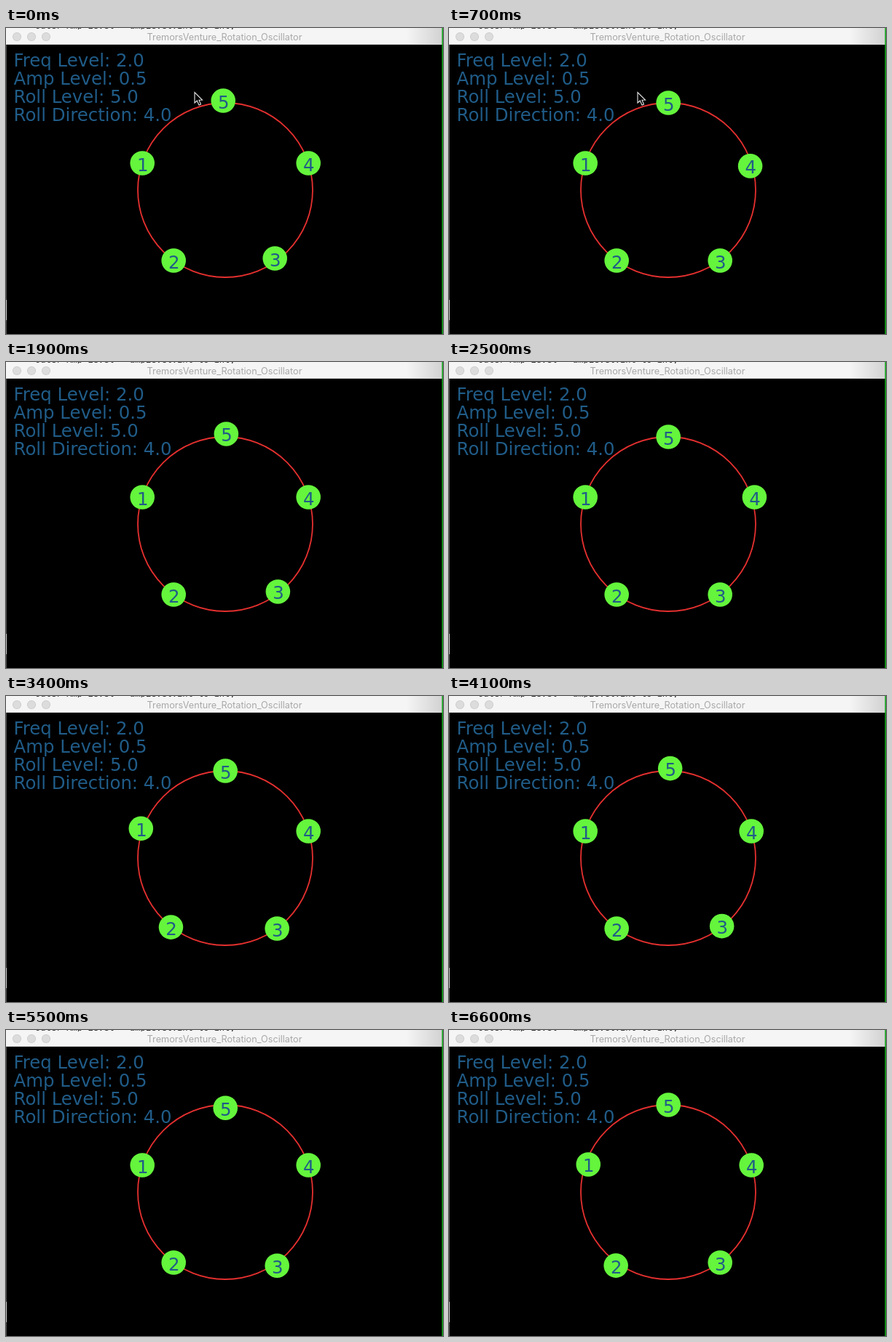
Write an HTML page with a canvas that moves like this. It is 600 px wide and 421 px high and loops after 6700 ms.

```html
<!DOCTYPE html>
<html lang="en">
<head>
<meta charset="utf-8">
<title>Actuator ring</title>
<style>
  html, body { margin: 0; width: 100%; height: 100%; overflow: hidden; background: #000; }
  canvas { display: block; width: 600px; height: 421px; }
</style>
</head>
<body>
<canvas id="stage" width="600" height="421"></canvas>
<script>
const ctx = document.getElementById('stage').getContext('2d');
const LOOP = 6700, STEP = 100, SWING = 4.2;
const BLUE = '#205c88', GREEN = '#64f53c', RED = '#e4302f';
const FONT = '24.4px "DejaVu Sans", Verdana, sans-serif';
const LEAVE = 1500, GONE = 1900;   // the pointer slips out through the title bar

const homes = { 1: [187, 186], 2: [230, 320], 3: [372, 320], 4: [415, 186], 5: [301, 103] };

// The buzz rolls through the ring: [start time, active nodes]
const rolls = [
  [0, '53'], [650, '4'], [1050, '12'],
  [1750, '53'], [2450, '4'], [2850, '12'],
  [3450, '53'], [4150, '4'], [4450, '12'],
  [5050, '53'], [5750, '4'], [6250, '12']
];

// Orbit phase in degrees over time
const phases = [
  [0, 225], [1400, 720], [2500, 1080], [3400, 1323],
  [4800, 1845], [5500, 2160], [6300, 2385], [6600, 2506]
];

function phaseAt(t) {
  let i = 1;
  while (i < phases.length - 1 && phases[i][0] < t) i++;
  const [t0, a] = phases[i - 1], [t1, b] = phases[i];
  return (a + (b - a) * (t - t0) / (t1 - t0)) * Math.PI / 180;
}

function activeAt(t) {
  return rolls.filter(r => r[0] <= t).pop()[1];
}

function rect(x, y, w, h, fill) {
  ctx.fillStyle = fill;
  ctx.fillRect(x, y, w, h);
}

function disc(x, y, r, fill) {
  ctx.beginPath();
  ctx.arc(x, y, r, 0, Math.PI * 2);
  ctx.fillStyle = fill;
  ctx.fill();
}

function label(text, x, y, font, fill, align = 'left') {
  ctx.font = font;
  ctx.fillStyle = fill;
  ctx.textAlign = align;
  ctx.fillText(text, x, y);
}

function drawWindow() {
  rect(0, 0, 600, 421, '#000');
  const bar = ctx.createLinearGradient(550, 0, 600, 0);
  bar.addColorStop(0, '#f6f5f6');
  bar.addColorStop(1, '#d2d1d2');
  rect(0, 0, 600, 22, bar);
  rect(0, 22, 600, 1, '#d0d0d0');

  // Sliver of the code editor behind the window
  ctx.save();
  ctx.beginPath();
  ctx.rect(0, 0, 598, 2);
  ctx.clip();
  label('outer Amp_Level = ampLevel.int to int;', 40, 1, '12px "DejaVu Sans Mono", monospace', '#333');
  ctx.restore();

  for (const x of [15, 35, 55]) {
    disc(x, 12, 6, '#c9c9c9');
    disc(x, 12, 5.2, '#dcdcdc');
  }
  label('TremorsVenture_Rotation_Oscillator', 300, 17, '12.7px Inter, Roboto, sans-serif', '#a9a8a9', 'center');

  rect(0, 23, 1, 398, '#4a4a4a');
  rect(0, 374, 1, 28, '#c8c8c8');
  rect(598.5, 0, 1.5, 421, '#10a818');
}

function drawReadout() {
  const lines = ['Freq Level: 2.0', 'Amp Level: 0.5', 'Roll Level: 5.0', 'Roll Direction: 4.0'];
  lines.forEach((line, i) => label(line, 10.6, 53 + 25 * i, FONT, BLUE));
}

function drawCursor(t) {
  if (t >= GONE) return;
  const k = Math.max(0, (t - LEAVE) / (GONE - LEAVE));
  const points = [[0, 0], [0, 14.5], [3.3, 11.5], [6, 17.5], [8.5, 16.5], [6, 10.7], [10.5, 10.5]];
  ctx.beginPath();
  points.forEach(([x, y]) => ctx.lineTo(259 + x, 88.5 - 100 * k * k + y));
  ctx.closePath();
  ctx.fillStyle = '#000';
  ctx.fill();
  ctx.strokeStyle = '#e8e8e8';
  ctx.lineWidth = 1.1;
  ctx.stroke();
}

function drawRing(t) {
  ctx.beginPath();
  ctx.arc(301, 223, 120, 0, Math.PI * 2);
  ctx.strokeStyle = RED;
  ctx.lineWidth = 1.8;
  ctx.stroke();

  const a = phaseAt(t), active = activeAt(t);
  const c = SWING * Math.cos(a), s = SWING * Math.sin(a);
  for (const id in homes) {
    let [x, y] = homes[id];
    if (active.includes(id)) {
      const direct = id === '1' || id === '4';
      x += direct ? c : s;
      y += direct ? s : c;
    }
    disc(x + 0.2, y, 16.8, GREEN);
    label(id, x + 0.8, y + 10.5, FONT, BLUE, 'center');
  }
}

function frame() {
  const t = Math.floor(performance.now() % LOOP / STEP) * STEP;
  drawWindow();
  drawReadout();
  drawRing(t);
  drawCursor(t);
  requestAnimationFrame(frame);
}
frame();
</script>
</body>
</html>
```
